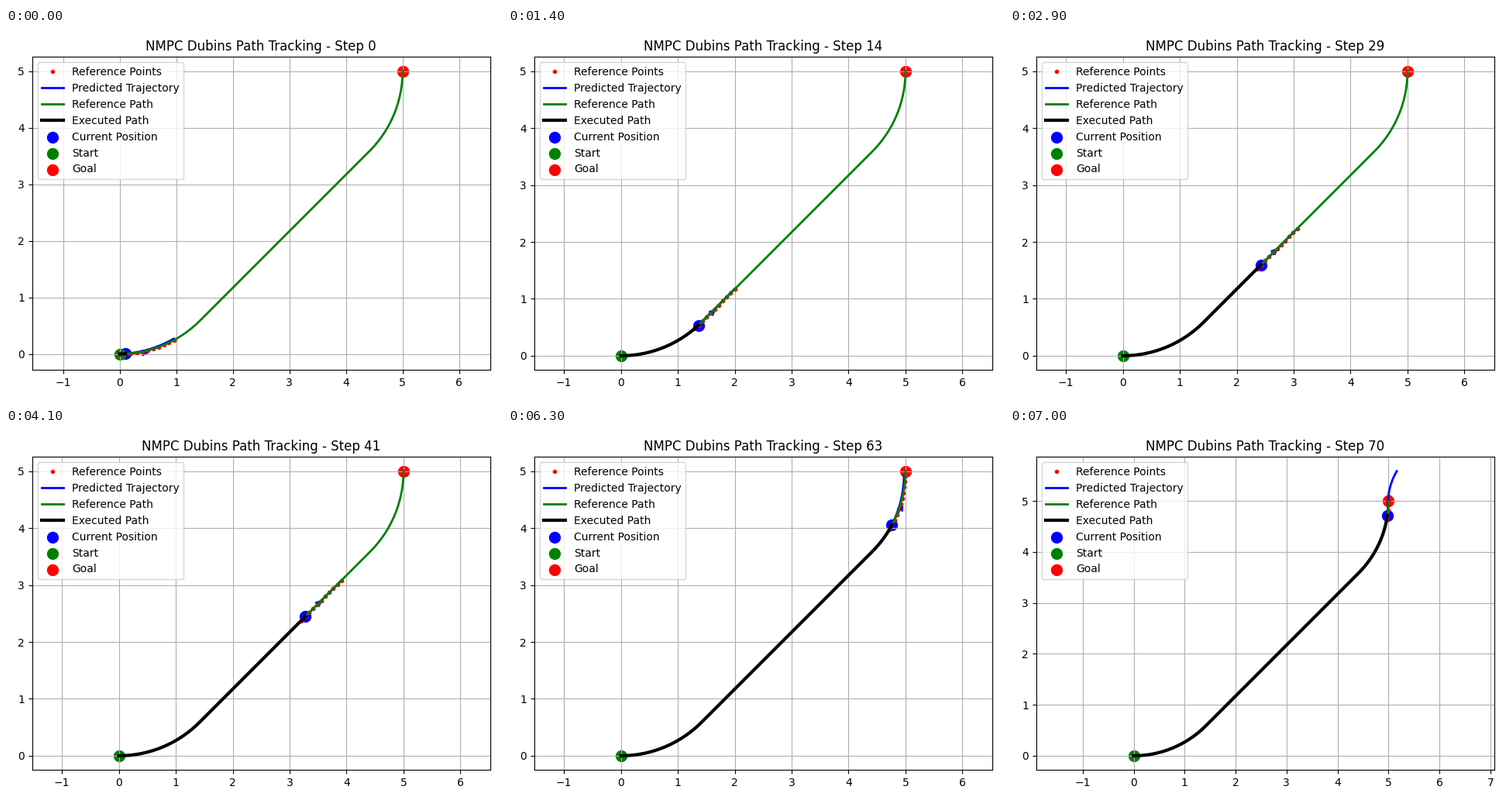
A matplotlib script that plays this animation: 640x480 px, repeating every 7100 ms.

```python
import numpy as np
import matplotlib.pyplot as plt
from matplotlib.animation import FuncAnimation

STEPS = 71
DT = 0.1
HORIZON = 10
RADIUS = 2.0
GOAL = 5.0
ARC = RADIUS * np.pi / 4
STRAIGHT = (GOAL - RADIUS) * np.sqrt(2)
LENGTH = 2 * ARC + STRAIGHT
OVERSHOOT_BEND = 0.8


def heading(s):
    """Heading along the path; past the goal it bends back to the right."""
    turn = np.minimum(s, ARC) + np.clip(s - ARC - STRAIGHT, 0, ARC)
    return turn / RADIUS - OVERSHOOT_BEND * np.maximum(s - LENGTH, 0)


def path_point(s):
    """Left arc, straight line, left arc, by travelled distance."""
    s = np.clip(s, 0, LENGTH)
    angle = heading(s)
    along = np.clip(s - ARC, 0, STRAIGHT) / np.sqrt(2)
    x = RADIUS * np.sin(angle) + along
    y = RADIUS * (1 - np.cos(angle)) + along
    return x, y


def predict(s):
    """Roll the vehicle forward over the horizon at unit speed."""
    x0, y0 = path_point(s)
    angles = heading(s + DT * np.arange(1, HORIZON + 1))
    x = x0 + DT * np.cumsum(np.cos(angles))
    y = y0 + DT * np.cumsum(np.sin(angles))
    return np.r_[x0, x], np.r_[y0, y]


fig, ax = plt.subplots(figsize=(6.4, 4.8), dpi=100)
reference = path_point(np.linspace(0, LENGTH, 150))


def update(step):
    ax.clear()
    start = DT * step
    now = start + DT
    x, y = path_point(now)
    angle = heading(now)

    ax.plot(*path_point(start + DT * np.arange(HORIZON + 1)), "r.",
            label="Reference Points")
    ax.plot(*predict(start), "b-", lw=2, label="Predicted Trajectory")
    ax.plot(*reference, "g-", lw=2, label="Reference Path")
    ax.plot(*path_point(DT * np.arange(step + 2)), "k-", lw=3,
            label="Executed Path")
    ax.scatter(x, y, c="blue", s=100, label="Current Position")
    ax.arrow(x, y, 0.3 * np.cos(angle), 0.3 * np.sin(angle),
             head_width=0.1, head_length=0.1, fc="blue", ec="blue")
    ax.scatter(0, 0, c="green", s=100, label="Start")
    ax.scatter(GOAL, GOAL, c="red", s=100, label="Goal")

    ax.set_title(f"NMPC Dubins Path Tracking - Step {step}")
    ax.legend(loc="upper left")
    ax.grid(True)
    ax.axis("equal")
    return []


update(0)
fig.tight_layout()
anim = FuncAnimation(fig, update, frames=STEPS, interval=100,
                     repeat=True, repeat_delay=0)
plt.show()
```
